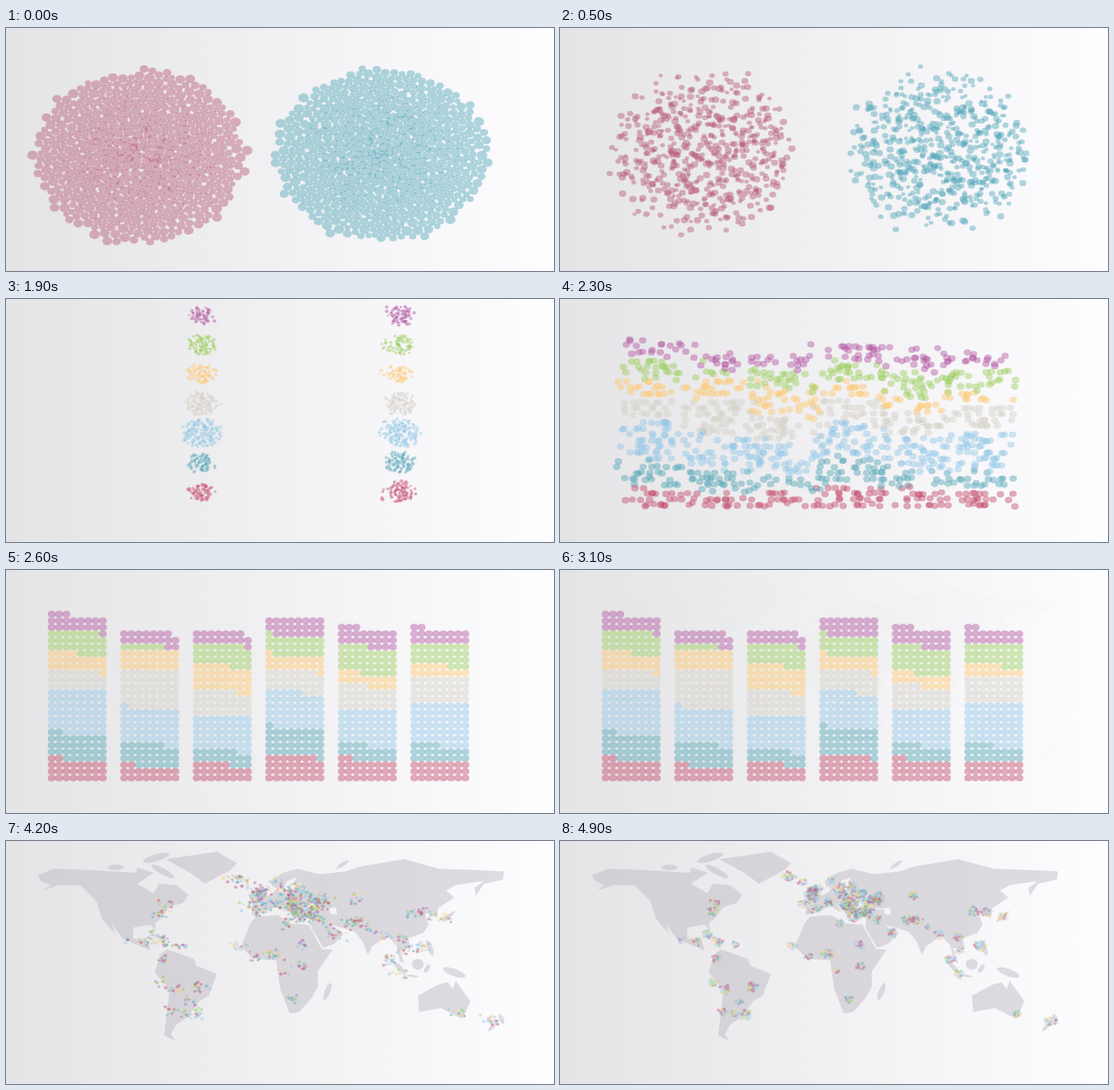
An HTML page with a canvas that plays this animation: 600x267 px, repeating every 5000 ms.

```html
<!DOCTYPE html>
<html lang="en">
<head>
<meta charset="utf-8">
<title>Dots regrouping</title>
<style>
html, body { margin: 0; width: 100%; height: 100%; overflow: hidden; background: #f1f0f2; }
canvas { display: block; width: 600px; height: 267px; }
</style>
</head>
<body>
<canvas></canvas>
<script>
const W = 600, H = 267, LOOP = 5000, SQUASH = 0.82;
const canvas = document.querySelector('canvas');
const ctx = canvas.getContext('2d');
const dpr = window.devicePixelRatio || 1;
canvas.width = W * dpr;
canvas.height = H * dpr;

// Seeded random numbers
let seed = 77;
function rand() {
  seed = (seed * 16807) % 2147483647;
  return seed / 2147483647;
}
for (let i = 0; i < 9; i++) rand();

const clamp = v => Math.max(0, Math.min(1, v));
const lerp = (a, b, p) => a + (b - a) * p;
const ramp = (t, from, to) => clamp((t - from) / (to - from));
const ease = u => u < 0.5 ? 4 * u ** 3 : 1 - 4 * (1 - u) ** 3;

// ---- Map: coasts as longitude, latitude ----
const world = new Path2D();
const px = lon => 282.5 + lon * 1.477;
const py = lat => 137 - lat * 1.5;

function coast(ring) {
  for (let i = 0; i < ring.length; i += 2)
    world[i ? 'lineTo' : 'moveTo'](px(ring[i]), py(ring[i + 1]));
  world.closePath();
}
function island(lon, lat, rx, ry, tilt = 0) {
  const x = px(lon), y = py(lat);
  world.moveTo(x + rx * Math.cos(tilt), y + rx * Math.sin(tilt));
  world.ellipse(x, y, rx, ry, tilt, 0, Math.PI * 2);
}

const northAmerica = [
  -168,66, -156,71, -128,70, -95,68, -94,72, -82,68, -94,60, -82,53, -78,60, -65,59, -56,52, -60,46,
  -70,43, -76,35, -81,31, -80,26, -84,30, -97,28, -97,20, -91,19, -87,21, -84,11, -77,8, -91,14,
  -105,20, -113,31, -110,23, -120,34, -124,47, -136,59, -152,59, -164,55, -158,59, -165,62
];
const southAmerica = [
  -77,8, -72,12, -52,5, -50,0, -35,-6, -41,-22, -48,-26, -57,-38, -65,-43, -69,-50, -66,-55, -74,-51,
  -70,-18, -81,-5
];
const greenland = [-73,78, -35,83.5, -20,75, -25,70, -44,60, -53,67];
const europe = [
  -9,37, -9,43, -1,46, -4,48, 8,54, 10,58, 11,54, 20,55, 28,60, 22,61, 25,65, 17,62, 14,56, 6,58,
  5,62, 14,68, 25,71, 41,67, 70,70, 70,46, 49,42, 41,42, 38,47, 31,46, 27,40, 23,36, 20,40,
  14,45, 17,39, 9,44, 0,39
];
const asia = [
  60,69, 73,73, 104,78, 130,71, 160,70, 178,69, 177,63, 163,60, 157,51, 156,57, 163,62, 142,59, 135,55,
  141,50, 129,42, 128,35, 119,39, 122,30, 118,24, 107,20, 109,12, 100,13, 104,2, 101,3, 98,15, 91,22,
  80,14, 77,8, 73,18, 67,25, 50,30, 59,23, 52,16, 44,13, 35,28, 36,36, 27,37, 27,40, 33,42,
  49,41, 49,38, 54,37, 53,46
];
const africa = [
  -6,36, 10,37, 20,31, 33,30, 43,12, 51,12, 40,-4, 40,-15, 35,-24, 26,-34, 19,-35, 12,-17, 9,4,
  -8,5, -17,14, -10,31
];
const australia = [
  114,-22, 129,-14, 136,-12, 140,-17, 142,-11, 153,-26, 147,-39, 131,-31, 115,-34
];
[northAmerica, southAmerica, greenland, europe, asia, africa, australia].forEach(coast);
island(-75, 69, 14, 3.5, 0.5);
island(-110, 72, 9, 3);
island(-80, 79, 15, 4, -0.3);
island(58, 74, 8, 2, -0.6);
island(47, -19, 10, 3, -1.2);
island(-2, 54, 6, 2.5, 1.2);
island(-19, 65, 6, 2.4);
island(114, 1, 6.5, 6);
island(100, -1, 10, 2.5, 0.8);
island(110, -7.5, 7, 1.2, 0.1);
island(121, -2, 5, 2.5, -1);
island(141, -5, 13, 4, 0.35);
island(123, 13, 9, 3, 1.2);
island(137, 36, 9, 2, -0.7);
island(176, -39, 6, 2.5, 1.2);
island(170, -44, 8, 2.2, -0.8);
island(-78, 21, 8, 1.5, 0.3);

// ---- Cities in stage pixels, plus a dense cloud over Europe ----
const spots = [
  133,108, 150,111, 161,102, 173,111, 192,114, 167,77, 170,68, 250,39, 172,129, 168,156, 181,163,
  210,160, 196,176, 178,188, 191,190, 203,191, 254,115, 272,127, 293,124, 304,143, 328,114, 329,138,
  317,174, 386,60, 380,87, 392,87, 365,101, 453,77, 467,78, 485,83, 403,95, 415,103, 436,105,
  438,120, 427,130, 437,146, 460,115, 501,190, 537,198
];
const cities = [];
for (let i = 0; i < spots.length; i += 2) cities.push({ x: spots[i], y: spots[i + 1] });
for (let i = 0; i < 45; i++) {
  const x = 265 + 84 * rand();
  cities.push({ x, y: 66 + (x - 300) * 0.15 + 25 * (rand() + rand() - 1) });
}

// ---- Dots ----
const sexes = ['#b55a7a', '#53a6b7'].map(rgb);
// Bands from the bottom up
const bands = ['#c44b6a', '#55a6b5', '#93c7e6', '#d3d0c5', '#ffc76c', '#9cce5e', '#b456a1'].map(rgb);
function rgb(hex) {
  const n = parseInt(hex.slice(1), 16);
  return [n >> 16, (n >> 8) & 255, n & 255];
}
// Running totals of each band, one row per column
const stacks = [
  [26, 58, 112, 135, 156, 183, 203],
  [18, 46, 89, 136, 160, 166, 183],
  [21, 38, 80, 110, 141, 167, 183],
  [31, 65, 109, 135, 153, 177, 200],
  [26, 44, 88, 116, 131, 164, 187],
  [24, 44, 96, 128, 141, 168, 186]
];

const dots = [];
stacks.forEach((ends, col) => {
  for (let i = 0; i < ends[6]; i++) {
    dots.push({
      sex: rand() < 0.48 ? 0 : 1,
      band: ends.findIndex(e => i < e),
      city: Math.floor(rand() * cities.length),
      size: 3.2 + 2.8 * rand(),
      lag: rand(),
      key: rand(),
      at: [null, null, { x: 50 + col * 79.4 + (i % 8) * 8, y: 228.5 - Math.floor(i / 8) * 7.2 }, null]
    });
  }
});
dots.sort((a, b) => a.key - b.key);

// Packs a group of circles round a centre and stores the places as one pose
function pack(group, pose, cx, cy, scale) {
  const pts = group.map((d, i) => {
    const r = 5 * Math.sqrt(i + 0.5), a = i * 2.39996;
    return { x: r * Math.cos(a), y: r * Math.sin(a), r: d.size };
  });
  for (let step = 0; step < 100; step++) {
    const pull = step < 65 ? 0.996 : 1;
    for (const p of pts) { p.x *= pull; p.y *= pull; }
    for (let i = 0; i < pts.length; i++) {
      const a = pts[i];
      for (let j = i + 1; j < pts.length; j++) {
        const b = pts[j], dx = b.x - a.x, dy = b.y - a.y, min = a.r + b.r;
        const d2 = dx * dx + dy * dy;
        if (d2 >= min * min || d2 === 0) continue;
        const d = Math.sqrt(d2), k = (min - d) / d / 2;
        a.x -= dx * k; a.y -= dy * k;
        b.x += dx * k; b.y += dy * k;
      }
    }
  }
  group.forEach((d, i) => {
    d.at[pose] = { x: cx + pts[i].x * scale, y: cy + pts[i].y * scale * SQUASH };
  });
}

const SMALL = 0.32, TINY = 0.3, UNIT = 4.15;
for (const sex of [0, 1]) {
  const group = dots.filter(d => d.sex === sex);
  pack(group, 0, sex ? 414 : 147, sex ? 138.5 : 140.5, 1);
  bands.forEach((_, b) =>
    pack(group.filter(d => d.band === b), 1, sex ? 434.5 : 213, 212 - b * 32.5, SMALL));
}
cities.forEach((c, i) => pack(dots.filter(d => d.city === i), 3, c.x, c.y, TINY));

// Moves between poses: start, spread of starts, duration
const moves = [[150, 100, 850], [1740, 80, 750], [3510, 80, 800]];

function place(d, t) {
  let i = 2;
  while (i > 0 && t < moves[i][0]) i--;
  const [start, spread, time] = moves[i];
  const p = ease(clamp((t - start - spread * d.lag) / time));
  const a = d.at[i], b = d.at[i + 1];
  const r = i === 0 ? d.size * lerp(1, SMALL, ramp(t, 50, 1050))
    : i === 1 ? lerp(d.size * SMALL, UNIT, p)
    : lerp(UNIT, d.size * TINY, p);
  return { x: lerp(a.x, b.x, p), y: lerp(a.y, b.y, p), r };
}

const back = ctx.createLinearGradient(0, 0, W, 0);
back.addColorStop(0, '#e4e3e5');
back.addColorStop(0.5, '#f1f0f2');
back.addColorStop(0.9, '#fbfafd');
back.addColorStop(1, '#fefdff');

function draw(t) {
  ctx.setTransform(dpr, 0, 0, dpr, 0, 0);
  ctx.globalAlpha = 1;
  ctx.fillStyle = back;
  ctx.fillRect(0, 0, W, H);

  ctx.globalAlpha = 0.45 * lerp(0.02, 1, ramp(t, 3070, 3650));
  ctx.fillStyle = '#b8b6be';
  ctx.fill(world);

  const tint = ramp(t, 1250, 1800);
  const paint = sexes.map(s => bands.map(b =>
    `rgb(${s.map((v, i) => Math.round(lerp(v, b[i], tint)))})`));
  const edge = 0.22 * ramp(t, 600, 1050);
  ctx.lineWidth = 0.6;
  for (const d of dots) {
    const { x, y, r } = place(d, t);
    ctx.beginPath();
    ctx.ellipse(x, y, r, r * 0.86, 0, 0, Math.PI * 2);
    ctx.fillStyle = ctx.strokeStyle = paint[d.sex][d.band];
    ctx.globalAlpha = 0.45;
    ctx.fill();
    if (edge > 0) {
      ctx.globalAlpha = edge;
      ctx.stroke();
    }
  }
}

const begin = performance.now();
function tick() {
  draw((performance.now() - begin) % LOOP);
  requestAnimationFrame(tick);
}
tick();
</script>
</body>
</html>
```
